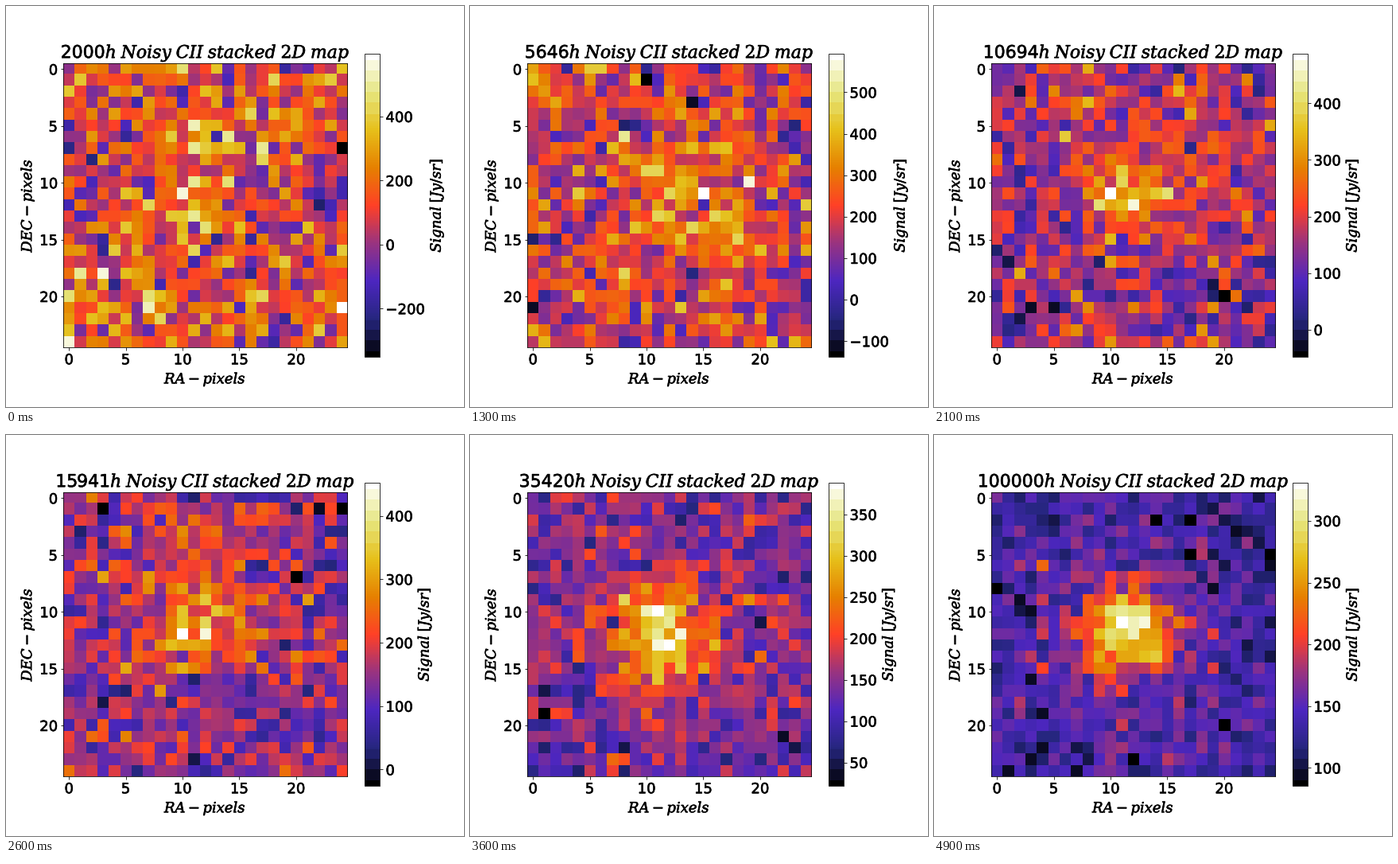
A matplotlib script that plays this animation: 576x504 px, repeating every 5000 ms.

```python
import numpy as np
import matplotlib.pyplot as plt
from matplotlib.animation import FuncAnimation
from matplotlib.colors import ListedColormap
from matplotlib.patheffects import withStroke
from matplotlib.text import Text
from matplotlib.ticker import MaxNLocator

FRAMES, INTERVAL, SIZE = 50, 100, 25
HOURS = np.geomspace(2000, 100000, FRAMES)

# Key points of the colour range: step, lowest signal, highest signal.
KEY_STEPS, KEY_LOWS, KEY_HIGHS = zip(
    (0, -351, 595), (6, -153, 622), (13, -138, 592), (21, -48, 487),
    (32, 1, 409), (41, 47.5, 361.5), (49, 85.5, 330.5))

Y, X = np.mgrid[:SIZE, :SIZE]
FREQ = np.fft.fftfreq(SIZE)
NOISE_FILTER = 1 + 2 * np.exp(-(FREQ[:, None]**2 + FREQ**2) / 0.08**2)
NOISE_FILTER[0, 0] = 0


def bump(height, width, center=11.5):
    return height * np.exp(-((X - center)**2 + (Y - center)**2) / (2 * width**2))


SOURCE = bump(140, 2.5) + bump(30, 6)


def stacked_map(step):
    """Source plus noise that falls with the square root of the hours."""
    rng = np.random.default_rng(100 + step)
    low = np.interp(step, KEY_STEPS, KEY_LOWS)
    high = np.interp(step, KEY_STEPS, KEY_HIGHS)
    white = np.fft.fft2(rng.normal(size=(SIZE, SIZE)))
    noise = np.fft.ifft2(white * NOISE_FILTER).real
    data = SOURCE + 140 * np.sqrt(HOURS[0] / HOURS[step]) * noise
    return np.interp(data, [data.min(), data.max()], [low, high]), low, high


def banded_cmap():
    """CMRmap with visible bands towards both ends."""
    u = np.linspace(0, 1, 256)
    bands = np.round(u * 28) / 28
    return ListedColormap(plt.get_cmap("CMRmap")(
        np.where(np.abs(u - 0.45) > 0.33, bands, u)))


plt.rcParams.update({
    "font.family": "DejaVu Sans",
    "font.size": 18,
    "mathtext.fontset": "dejavuserif",
    "figure.subplot.left": 0.125,
    "figure.subplot.right": 0.9,
    "figure.subplot.bottom": 0.125,
    "figure.subplot.top": 0.88,
})

fig, ax = plt.subplots(figsize=(8, 7), dpi=72)
image = ax.imshow(np.zeros((SIZE, SIZE)), cmap=banded_cmap(),
                  interpolation="nearest", vmin=0, vmax=1)
ax.set_xticks(range(0, SIZE, 5))
ax.set_yticks(range(0, SIZE, 5))
ax.set_xlabel(r"$RA-pixels$")
ax.set_ylabel(r"$DEC-pixels$")
title = ax.set_title("", fontsize=22)
bar = fig.colorbar(image, ax=ax,
                   ticks=MaxNLocator(9, steps=[1, 2, 2.5, 5, 10]))
bar.set_label(r"$Signal\;[Jy/sr]$")
heavy = [withStroke(linewidth=0.6, foreground="black")]


def draw(step):
    data, low, high = stacked_map(step)
    image.set_data(data)
    image.set_clim(low, high)
    title.set_text(rf"{HOURS[step]:.0f}$h\;Noisy\;CII\;stacked\;2D\;map$")
    bar.ax.get_yticklabels()  # creates the labels for the new range
    for text in fig.findobj(Text):
        text.set_path_effects(heavy)
    return image, title


animation = FuncAnimation(fig, draw, frames=FRAMES, interval=INTERVAL,
                          init_func=lambda: draw(0), repeat=True,
                          repeat_delay=0, blit=False)
plt.show()
```
